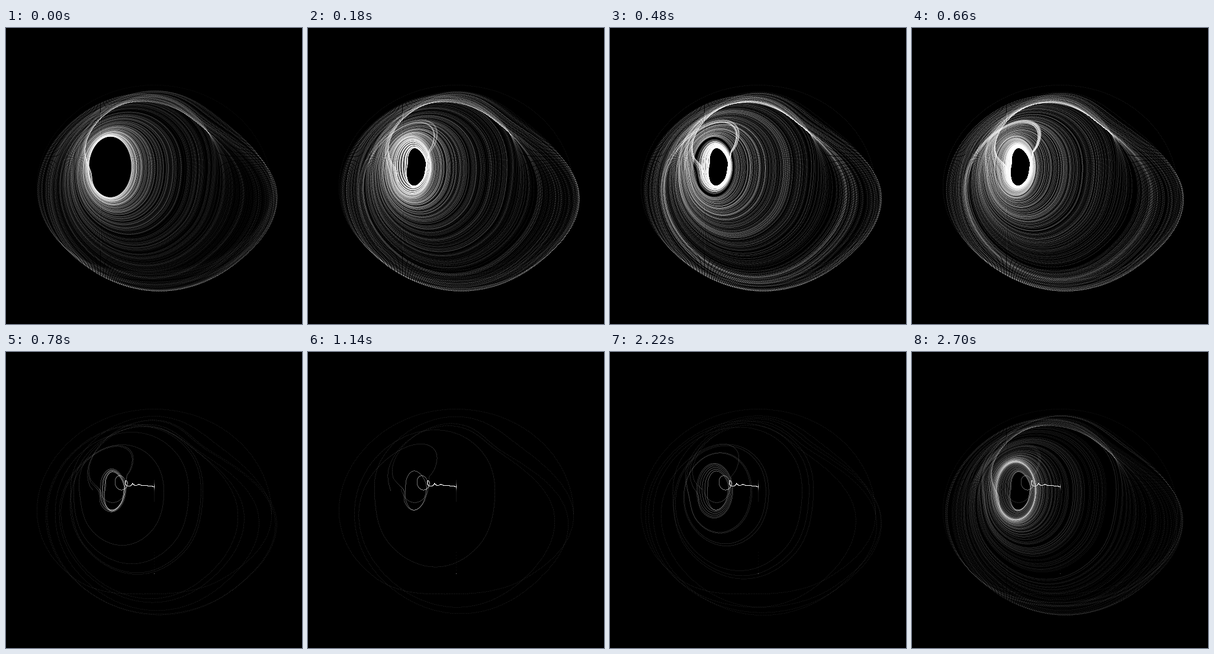
Recreate the animation shown at these times as an HTML page with a canvas. Size 500 by 500 pixels, loop 2760 ms.

```html
<!DOCTYPE html>
<html>
<head>
<meta charset="utf-8">
<style>
html, body { margin: 0; width: 100%; height: 100%; overflow: hidden; background: #000; }
canvas { display: block; width: 500px; height: 500px; }
</style>
</head>
<body>
<canvas id="stage" width="500" height="500"></canvas>
<script>
const SIZE = 500, STEP = 60, LOOP = 2760, DOTS = 96, EIGHTH = Math.PI / 4;
const ctx = document.getElementById('stage').getContext('2d');
const image = ctx.createImageData(SIZE, SIZE);
const hits = new Float32Array(SIZE * SIZE);
const cache = [];

const lerp = (a, b, u) => a + (b - a) * u;

function dot(x, y, weight = 1) {
  x = Math.round(x);
  y = Math.round(y);
  if (x >= 0 && y >= 0 && x < SIZE && y < SIZE) hits[y * SIZE + x] += weight;
}

// The sweep pushes the fold into the hole, so orbits escape sooner, then back again.
function settings(time) {
  const sweep = Math.sin(Math.PI * time / LOOP);
  const leaves = time > 690;
  return {
    leaves,
    depth: .19 * sweep - .01,
    count: leaves ? Math.round(4 * Math.exp(3.9 * ((time - 1500) / 1200) ** 2)) : 540,
    exposure: .037 + .045 * Math.sqrt(sweep)
  };
}

// Orbit size after one turn: growth, fold back to the rim, or a throw out of the hole
function nextSize(size, depth) {
  if (size < -.19) return 1 + 2 * size;
  return Math.min(size * (1.6 + 1.8 * size), 8.6 * (size - .76) ** 2 - depth);
}

// Sizes at eight angles of a turn, from the left side through the bottom
function turnSizes(size, next) {
  const bottom = size + 2.5 * size * size * (.9 - size);
  const right = size + 1.7 * size * size * (1 - size);
  const top = Math.max(lerp(right, next, .6), lerp(right, next, .22));
  return [
    size, lerp(size, bottom, .5), bottom, lerp(bottom, right, .5),
    right, lerp(right, next, .27), top, lerp(right, next, .7)
  ];
}

// Size 0 is the rim of the hole, size 1 the outer edge.
function plotOrbit(size, angle) {
  const out = Math.max(0, size), shrink = Math.exp(4 * Math.min(0, size));
  const cx = 175 + (size > 0 ? 75 : -25) * size;
  const cy = 234 + (size > 0 ? 39 : 25) * size;
  dot(cx - (34 * shrink + 164 * out) * Math.cos(angle),
      cy + (50 * shrink + 127 * out) * Math.sin(angle));
}

function spline(a, b, c, d, u) {
  return b + .5 * u * (c - a + u * (2 * a - 5 * b + 4 * c - d + u * (3 * (b - c) + d - a)));
}

function plotSwirl({ count, depth, leaves }) {
  const sizes = [1, 1, 1, 1];
  let size = 1;
  for (let n = 1; n < count + 40; n++) {
    if (n >= count && (!leaves || size < .04)) break;
    const next = nextSize(size, depth);
    sizes.push(...turnSizes(size, next));
    size = next;
  }
  sizes.push(size);
  const last = sizes.length - 1;
  for (let i = 0; i < last; i++) {
    const a = sizes[Math.max(0, i - 1)], b = sizes[i];
    const c = sizes[i + 1], d = sizes[Math.min(last, i + 2)];
    for (let j = 0; j < DOTS; j++) {
      const u = j / DOTS;
      plotOrbit(spline(a, b, c, d, u), (i + 4 + u) * EIGHTH);
    }
  }
}

// A shrinking loop that drifts to rest on the vertical axis
function plotExit() {
  const turns = 6, total = turns * 4 * DOTS;
  for (let i = 0; i < total; i++) {
    const t = i / total * turns, angle = t * 2 * Math.PI, reach = Math.exp(-t);
    dot(182 + 68 * t / turns - 25 * reach * Math.cos(angle),
        222 + 9 * reach * reach + 5 * (t / turns) ** 2 + 33 * reach * Math.sin(angle),
        1 + t / 2);
  }
  for (let y = 216; y < 253; y++) dot(250, y, 40 * Math.exp(-Math.abs(y - 227) / 2) + 1);
  for (let y = 338; y < 374; y += 5) dot(250, y);
  dot(250, 374, 8);
}

function render(time) {
  const view = settings(time);
  hits.fill(0);
  plotSwirl(view);
  if (view.leaves) plotExit();
  return Uint8ClampedArray.from(hits, h => 255 * (1 - Math.exp(-h * view.exposure)));
}

let shown = -1;
function draw(now) {
  const step = Math.floor(now % LOOP / STEP);
  if (step === shown) return;
  shown = step;
  const shades = cache[step] || (cache[step] = render(step * STEP));
  for (let i = 0; i < shades.length; i++) {
    image.data.fill(shades[i], i * 4, i * 4 + 3);
    image.data[i * 4 + 3] = 255;
  }
  ctx.putImageData(image, 0, 0);
}

const start = performance.now();
function tick() {
  draw(performance.now() - start);
  requestAnimationFrame(tick);
}
tick();
</script>
</body>
</html>
```
